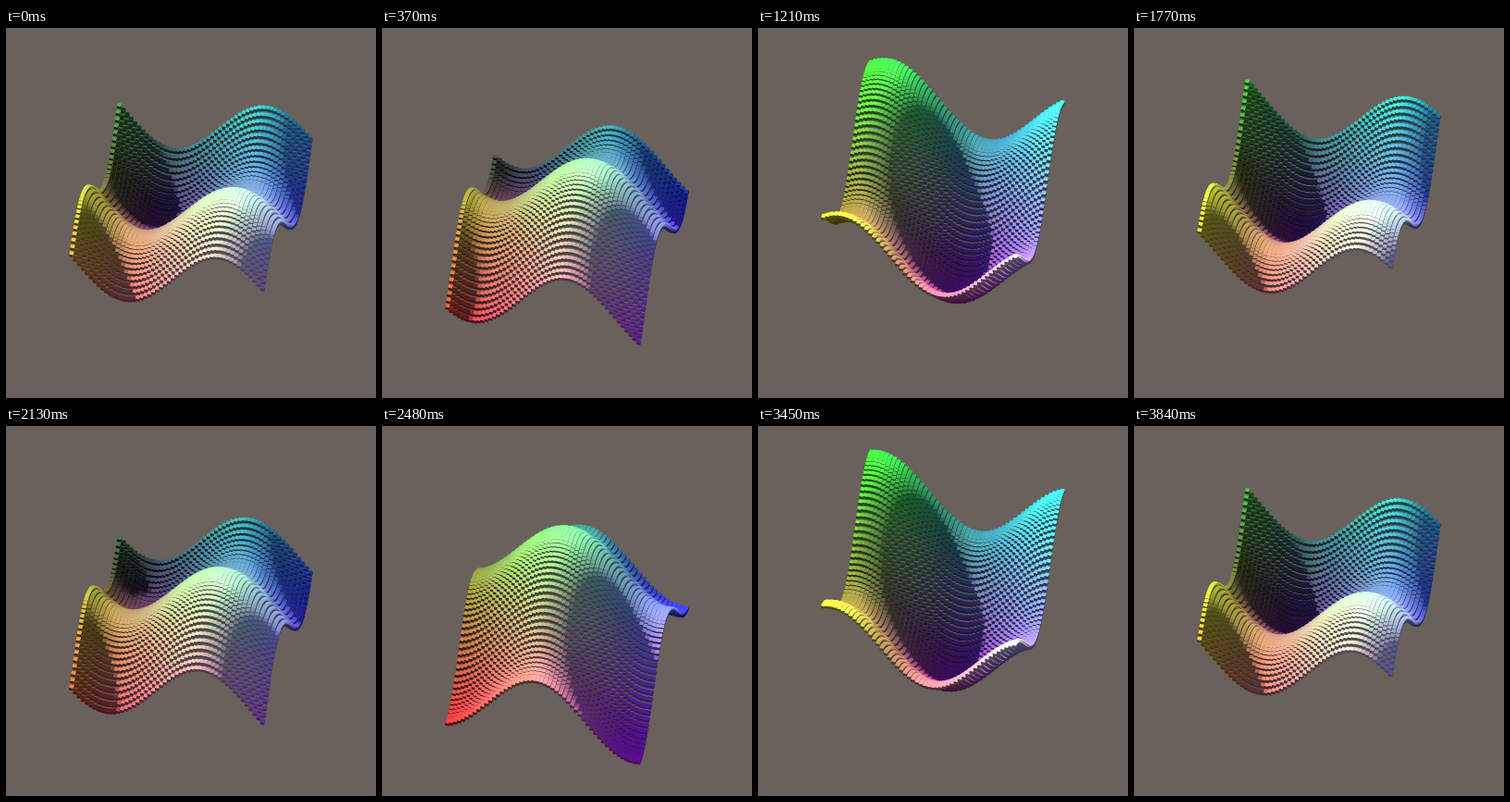
An HTML page with a canvas that plays this animation: 400 px wide and 400 px high, repeating every 3940 ms.

```html
<!DOCTYPE html>
<html lang="en">
<head>
<meta charset="utf-8">
<title>Sine surface</title>
<style>
html, body { margin: 0; height: 100%; overflow: hidden; background: #69615b; }
canvas { display: block; }
</style>
</head>
<body>
<canvas id="stage" width="400" height="400"></canvas>
<script>
const ctx = document.getElementById("stage").getContext("2d");
const LOOP = 3940, N = 50, SIZE = 2 / N;

// Orthographic camera: screen vector of one unit along each world axis
const YAW = 0.2445, PITCH = 0.92, SCALE = 108.6;
const axis = (right, near, up) =>
  [SCALE * right, SCALE * (near * Math.sin(PITCH) - up * Math.cos(PITCH))];
const AXES = [
  axis(-Math.sin(YAW), Math.cos(YAW), 0),
  axis(0, 0, 1),
  axis(Math.cos(YAW), Math.sin(YAW), 0)
];
const [EDGE_X, EDGE_Y, EDGE_Z] = AXES.map(v => v.map(c => c * SIZE / 2));
const LIGHT = [-0.321, 0.766, -0.557];

// Start in ms, wave time there, number of held poses until the next key
const KEYS = [[0, -0.058, 8], [760, 0.737, 5], [1210, 1.29, 4], [1770, 1.81, 7],
  [2480, 2.56, 4], [2990, 3.01, 9], [3840, 3.873, 1], [LOOP, 3.942, 1]];

const clamp = v => Math.max(0, Math.min(1, v));
const height = (x, z, t) => (Math.sin(Math.PI * (x + t)) + Math.sin(Math.PI * (z + t))) / 2;

function waveTime(ms) {
  const k = KEYS.findIndex(key => key[0] > ms);
  const [start, from, steps] = KEYS[k - 1], [end, to] = KEYS[k];
  return from + (to - from) * Math.floor((ms - start) / (end - start) * steps) / steps;
}

// March towards the light: 1 is fully lit, 0 is in shadow
function lightAt(x, y, z, t) {
  let over = -1;
  for (let s = 0.04; s < 1.6; s += 0.05) {
    const [px, py, pz] = [x, y, z].map((v, i) => v + LIGHT[i] * s);
    if (px < -1 || pz < -1 || py > 1) break;
    over = Math.max(over, height(px, pz, t) - py);
  }
  return clamp(0.5 - over / 0.05);
}

function shade(albedo, ambient, diffuse, shine) {
  return `rgb(${albedo.map((a, i) =>
    Math.round(255 * clamp(a * (ambient[i] + diffuse[i]) + shine)))})`;
}

// Cube face: shifted from the centre by n, spanned by u and v
function face([cx, cy], n, u, v, color) {
  const grow = 1.04;
  ctx.fillStyle = color;
  ctx.beginPath();
  for (const [p, q] of [[-1, -1], [-1, 1], [1, 1], [1, -1]]) {
    ctx.lineTo(cx + n[0] + grow * (p * u[0] + q * v[0]),
               cy + n[1] + grow * (p * u[1] + q * v[1]));
  }
  ctx.fill();
}

function draw(t) {
  ctx.fillStyle = "#69615b";
  ctx.fillRect(0, 0, 400, 400);
  for (let i = 0; i < N; i++) {
    for (let j = 0; j < N; j++) {
      const x = (i + 0.5) * SIZE - 1, z = (j + 0.5) * SIZE - 1;
      const pos = [x, height(x, z, t), z];
      const center = [200, 194.8].map((c, k) =>
        c + pos.reduce((sum, p, a) => sum + p * AXES[a][k], 0));
      const albedo = pos.map(p => p / 2 + 0.5);
      const lit = lightAt(...pos, t);
      const side = shade(albedo, [0.28, 0.3, 0.34], [0, 0, 0], 0.03);
      const top = shade(albedo, [0.3, 0.37, 0.55],
        [0.54, 0.47, 0.28].map(d => d * lit), 0.05 + 0.21 * lit);
      face(center, EDGE_Z, EDGE_X, EDGE_Y, side);
      face(center, EDGE_X, EDGE_Y, EDGE_Z, side);
      face(center, EDGE_Y, EDGE_X, EDGE_Z, top);
    }
  }
}

let shown;
function tick() {
  const t = waveTime(performance.now() % LOOP);
  if (t !== shown) draw(shown = t);
  requestAnimationFrame(tick);
}
tick();
</script>
</body>
</html>
```
